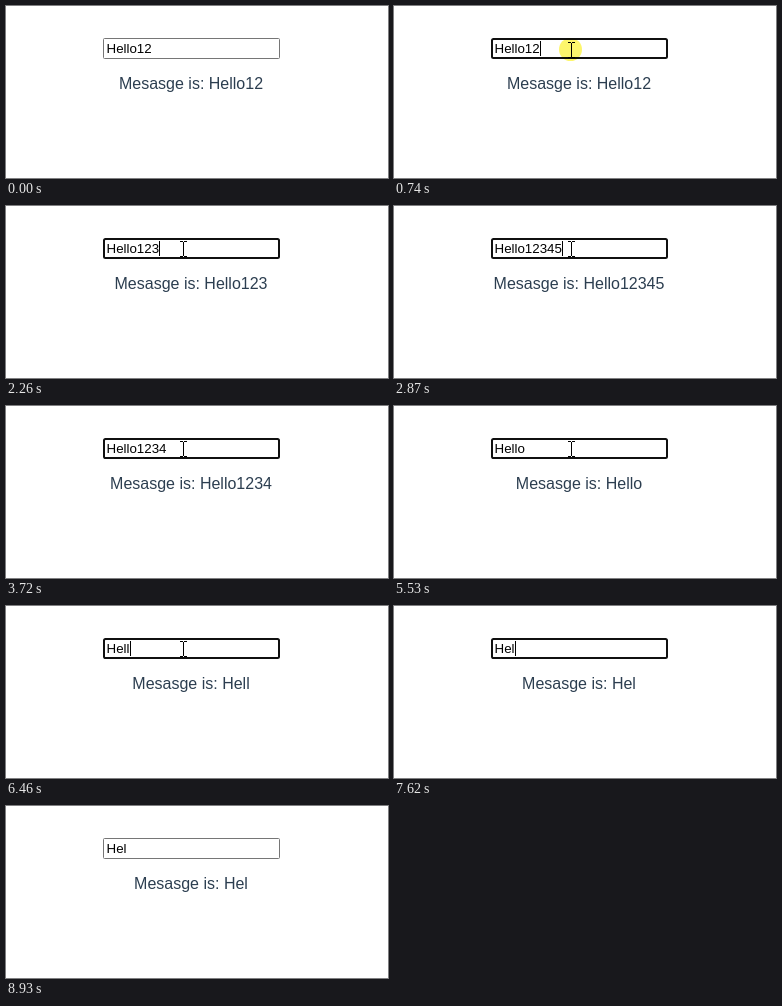
These frames come from a looping animation (382 px wide and 172 px high, 9060 ms). An HTML page:

```html
<!DOCTYPE html>
<html lang="en">
<head>
<meta charset="utf-8">
<title>Message binding</title>
<style>
  html, body { margin: 0; width: 100%; height: 100%; overflow: hidden; background: #fff; }
  svg { display: block; width: 382px; height: 172px; }
  text { font-family: "Liberation Sans", Arial, sans-serif; white-space: pre; }
  #field { font-size: 13.3333px; fill: #000; }
  #message { font-size: 16px; fill: #2c3e50; text-anchor: middle; }
  #glow { fill: #fdf66c; mix-blend-mode: multiply; }
</style>
</head>
<body>
<svg viewBox="0 0 382 172">
  <rect id="rest" x="97.5" y="32.5" width="176" height="20" rx="1" fill="#fff" stroke="#767676"/>
  <rect id="ring" x="98" y="33" width="175" height="19" rx="1.5" fill="#fff" stroke="#101010" stroke-width="2"/>
  <text id="field" x="100.5" y="47"></text>
  <rect id="caret" y="35" width="1" height="15" shape-rendering="crispEdges"/>
  <text id="message" x="185" y="83"></text>
  <circle id="glow" cx="176.5" cy="43.5" r="11.5"/>
  <g id="pointer">
    <path id="arrow" d="M.5 .5V16.5L4.2 13L6.7 18.5L9 17.5L6.6 12.2H11.7Z" fill="#fff" stroke="#000"/>
    <path id="beam" d="M-3 -7.5H0M1 -7.5H4M.5 -7V7M-3 7.5H0M1 7.5H4" fill="none" stroke="#000" shape-rendering="crispEdges"/>
  </g>
</svg>
<script>
const LOOP = 9060;
const $ = id => document.getElementById(id);
const show = (id, on) => $(id).setAttribute("visibility", on ? "visible" : "hidden");

const start = { text: "Hello12", focus: false, caret: false, glow: false, shape: "", x: 0, y: 0 };

// Each entry changes part of the state from its time (ms) onwards.
const changes = [
  [260, { shape: "arrow", x: 281, y: 157 }],
  [330, { x: 262, y: 128 }],
  [400, { x: 236, y: 96 }],
  [470, { x: 206, y: 66 }],
  [530, { shape: "beam", x: 188, y: 48 }],
  [600, { x: 177, y: 44 }],
  [670, { focus: true, caret: true, glow: true }],
  [870, { glow: false }],
  [1270, { caret: false, y: 43 }],
  [1800, { caret: true }],
  [2260, { text: "Hello123" }],
  [2520, { text: "Hello1234" }],
  [2870, { text: "Hello12345" }],
  [3400, { caret: false }],
  [3720, { text: "Hello1234" }],
  [3870, { text: "Hello123" }],
  [3940, { caret: true }],
  [4000, { text: "Hello12" }],
  [4140, { text: "Hello1" }],
  [4470, { caret: false }],
  [4670, { text: "Hello" }],
  [5000, { caret: true }],
  [5530, { caret: false }],
  [6000, { caret: true }],
  [6460, { text: "Hell" }],
  [6590, { text: "Hel" }],
  [7070, { caret: false }],
  [7270, { x: 229 }],
  [7340, { shape: "" }],
  [7620, { caret: true }],
  [8140, { caret: false }],
  [8670, { caret: true }],
  [8930, { focus: false, caret: false }]
];

function stateAt(time) {
  const state = { ...start };
  for (const [from, change] of changes) {
    if (from <= time) Object.assign(state, change);
  }
  return state;
}

function draw(state) {
  const field = $("field");
  if (field.textContent !== state.text) {
    field.textContent = state.text;
    $("message").textContent = "Mesasge is: " + state.text;
    $("caret").setAttribute("x", Math.round(100.6 + field.getComputedTextLength()));
  }
  show("rest", !state.focus);
  show("ring", state.focus);
  show("caret", state.caret);
  show("glow", state.glow);
  show("arrow", state.shape === "arrow");
  show("beam", state.shape === "beam");
  $("pointer").setAttribute("transform", `translate(${state.x} ${state.y})`);
}

const begin = performance.now();
function tick() {
  draw(stateAt((performance.now() - begin) % LOOP));
  requestAnimationFrame(tick);
}
tick();
</script>
</body>
</html>
```
